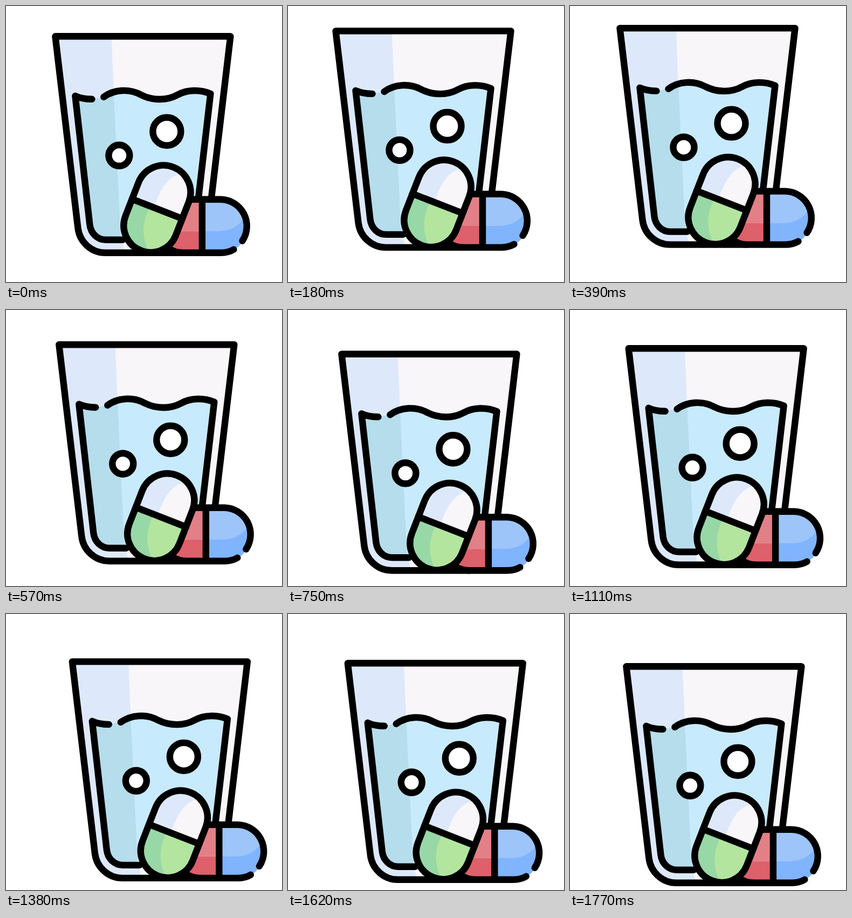
An HTML page that plays this animation: 512x512 px, repeating every 1800 ms.

```html
<!DOCTYPE html>
<html lang="en">
<head>
<meta charset="utf-8">
<title>Water and pills</title>
<style>
  html, body { margin: 0; width: 100%; height: 100%; overflow: hidden; background: #fff; }
  svg { display: block; width: 100%; height: 100%; }
  .line { fill: none; stroke: #000; stroke-width: 12.4; stroke-linecap: round; stroke-linejoin: round; }
  .bubble { fill: #fff; }
</style>
</head>
<body>
<svg viewBox="0 0 512 512">
  <defs>
    <clipPath id="glass"><path d="M91 56H416L369 457H184C158 457 136 437 133 411Z"/></clipPath>
    <clipPath id="water"><path d="M128 166Q141 172 159 172L181 168C200 154 228 152 250 164C272 175 298 175 318 164C336 154 360 154 379 162L347 433H185C169 433 157 421 155 405Z"/></clipPath>
    <clipPath id="tablet"><path d="M300 358H398A49.500 49.500 0 0 1 438 435Q434 446 422 451Q412 457 398 457H328Q312 457 300 448Z"/></clipPath>
    <clipPath id="capsule"><rect x="-50" y="-83" width="100" height="166" rx="50" transform="translate(280 375.5) rotate(21.3)"/></clipPath>
  </defs>
  <g id="scene">
    <g clip-path="url(#glass)">
      <path fill="#f8f6f9" d="M80 50H430V470H80Z"/>
      <path fill="#dde9fb" d="M80 50H195L200 170L212 420Q214 440 221 457H80Z"/>
    </g>
    <g clip-path="url(#water)">
      <path fill="#c8eafd" d="M120 140H390V440H120Z"/>
      <path fill="#b6ddec" d="M120 140H199L200 170L212 420L214 440H120Z"/>
    </g>
    <path class="line" d="M381 352L416 55.500H91L133 411C136 437 158 457 184 457H328"/>
    <path class="line" d="M159 172Q141 172 128 166L155 405C157 421 169 433 185 433H216"/>
    <path class="line" d="M181 168C200 154 228 152 250 164C272 175 298 175 318 164C336 154 360 154 379 162L357 352"/>
    <circle class="line bubble" cx="298" cy="232" r="26"/>
    <circle class="line bubble" cx="209.500" cy="276.500" r="19.500"/>

    <g clip-path="url(#tablet)">
      <path fill="#e37f87" d="M290 350H363V417H290Z"/>
      <path fill="#dd606b" d="M290 417H363V460H290Z"/>
      <path fill="#9dc5fa" d="M363 350H460V460H363Z"/>
      <path fill="#80b4fd" d="M363 417H394Q425 417 442 392H460V460H363Z"/>
    </g>
    <path class="line" d="M335 358H398A49.500 49.500 0 0 1 438 435M422 451Q412 457 398 457H328Q312 457 300 448M363.500 358V457"/>

    <g clip-path="url(#capsule)">
      <path fill="#f8f6f9" d="M200 280H360V470H200Z"/>
      <path fill="#dde9fb" d="M200 280H350L328 309C298 316 286 338 272 378L200 345Z"/>
      <path fill="#b3e59f" d="M187 339L373 411V470H187Z"/>
      <path fill="#97d8a6" d="M187 339L267 370C253 398 249 425 266 457H187Z"/>
    </g>
    <g transform="translate(280 375.5) rotate(21.3)">
      <rect class="line" x="-50" y="-83" width="100" height="166" rx="50"/>
      <path class="line" d="M-50 0H50"/>
    </g>
  </g>
</svg>
<script>
  const LOOP = 1800, STEP = 30;
  const scene = document.getElementById('scene');

  // Key points of the drift: [time, offset]
  const driftX = [[0, 0], [200, -3], [660, 8], [900, 8], [1390, 31.5], [1770, 13]];
  const driftY = [[0, 0], [338, -18], [540, 5], [860, 30], [1110, 15], [1500, 37], [1620, 35], [1770, 41]];

  const secant = ([t0, v0], [t1, v1]) => (v1 - v0) / (t1 - t0);

  // Flat at the ends and turning points, otherwise a mean of both sides
  function slope(keys, i) {
    if (i === 0 || i === keys.length - 1) return 0;
    const a = secant(keys[i - 1], keys[i]), b = secant(keys[i], keys[i + 1]);
    return a * b > 0 ? 2 * a * b / (a + b) : 0;
  }

  // Smooth curve through the keys
  function sample(keys, t) {
    const i = Math.max(1, keys.findIndex(([time]) => time >= t));
    const [t0, v0] = keys[i - 1], [t1, v1] = keys[i];
    const h = t1 - t0, u = (t - t0) / h, w = 1 - u;
    return w * w * ((1 + 2 * u) * v0 + u * h * slope(keys, i - 1))
         + u * u * ((3 - 2 * u) * v1 - w * h * slope(keys, i));
  }

  function draw() {
    const t = Math.floor(performance.now() % LOOP / STEP) * STEP;
    const x = sample(driftX, t) + 0.4, y = sample(driftY, t) + 0.8;
    scene.setAttribute('transform', `translate(${x} ${y})`);
    requestAnimationFrame(draw);
  }
  draw();
</script>
</body>
</html>
```
